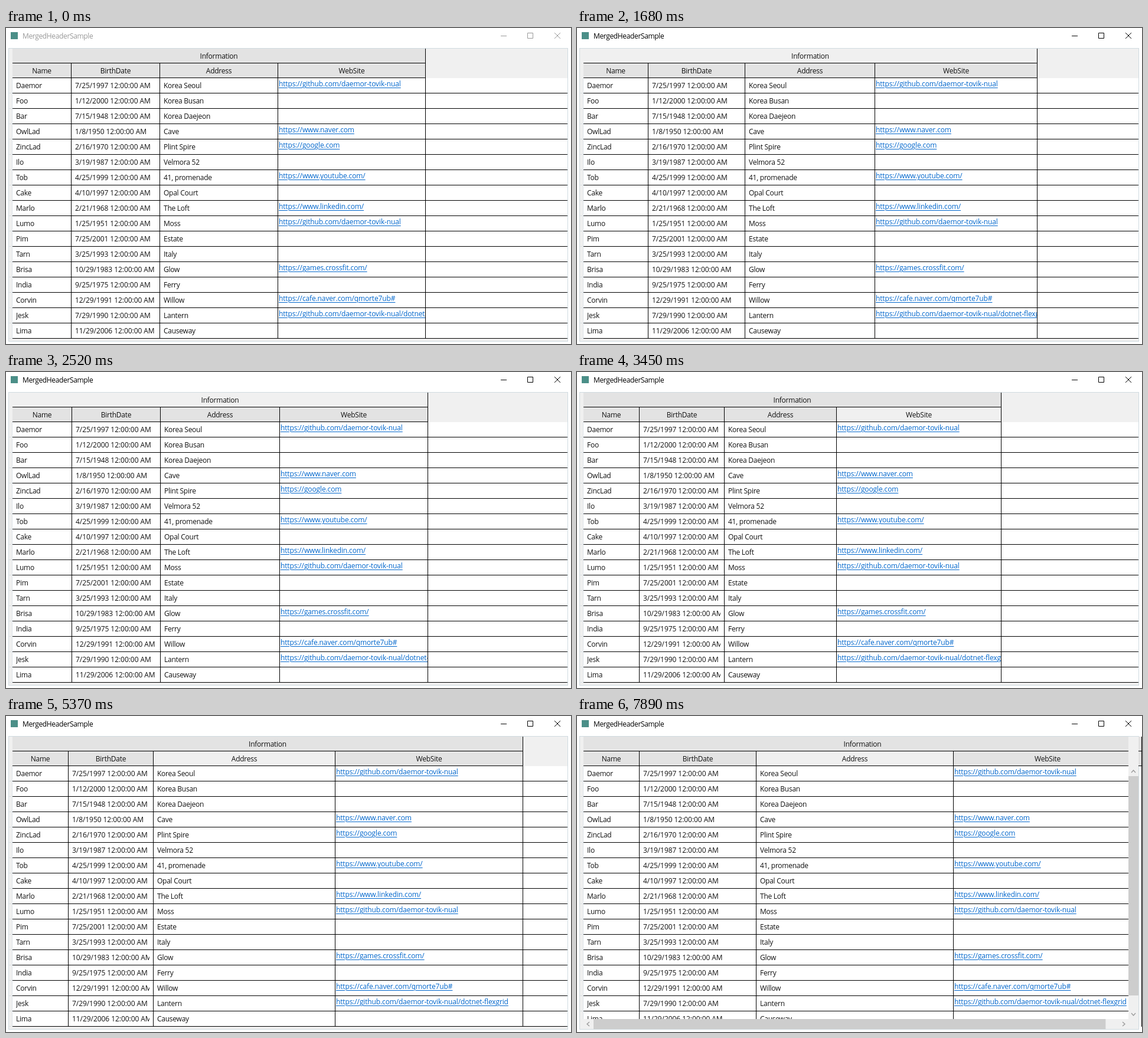
Write an HTML page that moves like this. It is 957 px wide and 536 px high and loops after 8 s.

```html
<!DOCTYPE html>
<html lang="en">
<head>
<meta charset="utf-8">
<title>MergedHeaderSample</title>
<style>
  html, body { margin: 0; width: 100%; height: 100%; overflow: hidden; background: #fff; }
  body { position: relative; font: 12px "Open Sans", "Noto Sans", sans-serif; letter-spacing: -.25px; color: #111; }
  div, svg { position: absolute; box-sizing: border-box; white-space: pre; }
  #title { left: 28px; top: 0; line-height: 27px; letter-spacing: -.36px; }
  #icon { left: 8px; top: 7px; width: 12px; height: 12px; background: #4b8f88; }
  #buttons { left: 0; top: 0; width: 957px; height: 30px; fill: none; stroke: currentColor; }
  #grid { left: 4px; top: 34px; width: 948px; height: 498px; border: 1px solid #cfdae0; background: #f0f0f0; }
  #rows { left: 11px; top: 85px; width: 940px; height: 442px;
    background: repeating-linear-gradient(#fff 0 25px, #000 25px 26px); }
  #ticks { left: 5px; top: 85px; width: 6px; height: 442px;
    background: repeating-linear-gradient(#f0f0f0 0 25px, #dde3e6 25px 26px); border-right: 1px solid #dde3e6; }
  .head { height: 25px; line-height: 25px; text-align: center; background: #e3e3e3; border-bottom: 1px solid #000; }
  .head.hover { background: #f0f0f0; }
  #info { left: 11px; top: 35px; border-right: 1px solid #000; }
  .col { top: 60px; height: 467px; border-right: 1px solid #000; overflow: hidden; }
  .col .head { left: 0; width: 100%; }
  .cell { left: 6px; right: 6px; height: 25px; line-height: 26px; overflow: hidden; }
  .date { letter-spacing: -.06px; }
  .link { left: 1px; right: 0; line-height: 19px; letter-spacing: -.13px; color: #06c;
    text-decoration: underline 1px; text-underline-offset: 2px; }
  #bars { left: 0; top: 0; width: 957px; height: 536px; }
</style>
</head>
<body>
<div id="icon"></div>
<div id="title">MergedHeaderSample</div>
<svg id="buttons"><path d="M838 13.5h10M883.5 8.5h9v9h-9z M929 8l10 10m0-10l-10 10"/></svg>
<div id="grid"></div>
<div id="rows"></div>
<div id="ticks"></div>
<div id="info" class="head">Information</div>
<svg id="bars">
  <path fill="#f0f0f0" d="M934 35h17v496h-17zM5 514h946v17H5z"/>
  <path fill="#cdcdcd" d="M934 102h17v372h-17z"/>
  <rect id="thumb" fill="#cdcdcd" x="28" y="514" height="17"/>
  <path fill="none" stroke="#999" stroke-width="1.3"
    d="M939 96l3.5-4 3.5 4M939 504l3.5 4 3.5-4M21 519l-4 3.5 4 3.5M924 519l4 3.5-4 3.5"/>
</svg>
<script>
const site = 'https://github.com/daemor-tovik-nual';
const people = `Daemor|7/25/1997|Korea Seoul|${site}
Foo|1/12/2000|Korea Busan|
Bar|7/15/1948|Korea Daejeon|
OwlLad|1/8/1950|Cave|https://www.naver.com
ZincLad|2/16/1970|Plint Spire|https://google.com
Ilo|3/19/1987|Velmora 52|
Tob|4/25/1999|41, promenade|https://www.youtube.com/
Cake|4/10/1997|Opal Court|
Marlo|2/21/1968|The Loft|https://www.linkedin.com/
Lumo|1/25/1951|Moss|${site}
Pim|7/25/2001|Estate|
Tarn|3/25/1993|Italy|
Brisa|10/29/1983|Glow|https://games.crossfit.com/
India|9/25/1975|Ferry|
Corvin|12/29/1991|Willow|https://cafe.naver.com/qmorte7ub#
Jesk|7/29/1990|Lantern|${site}/dotnet-flexgrid
Lima|11/29/2006|Causeway|`.split('\n').map(line => line.split('|'));

const $ = id => document.getElementById(id);
function add(parent, className, text = '') {
  const el = document.createElement('div');
  el.className = className;
  el.textContent = text;
  parent.append(el);
  return el;
}

const heads = [$('info')];
const cols = ['Name', 'BirthDate', 'Address', 'WebSite'].map((name, c) => {
  const col = add(document.body, 'col');
  heads.push(add(col, 'head', name));
  people.forEach((person, r) => {
    const text = person[c] + (c == 1 ? ' 12:00:00 AM' : '');
    add(col, 'cell' + ['', ' date', '', ' link'][c], text).style.top = 25 + 26 * r + 'px';
  });
  return col;
});
document.body.append($('bars'));

// Piecewise linear value through [time, value] points.
function track(t, points) {
  let [t0, v0] = points[0];
  for (const [t1, v1] of points) {
    if (t < t1) return t <= t0 ? v0 : v0 + (v1 - v0) * (t - t0) / (t1 - t0);
    [t0, v0] = [t1, v1];
  }
  return v0;
}

const total = [[1320, 700], [1380, 710], [1980, 827], [2100, 836], [2250, 836],
  [2340, 800], [2520, 704], [2610, 675], [2670, 668]];
const grow = [
  [[0, 0]],
  [[7440, 0], [7560, 12], [7770, 45], [7890, 54]],
  [[4920, 0], [4950, 4], [5100, 38], [5340, 112], [5520, 144]],
  [[3270, 0], [3360, 14], [3540, 66], [3630, 80]]
];
// Header under the pointer from each time on.
const hovers = [[0, -1], [840, 0], [2970, 4], [4230, 3], [6540, 2], [7890, 3]];

function draw(now) {
  const t = Math.floor(now % 8000 / 30) * 30;
  const scale = track(t, total) / 700;
  let edge = 11;
  cols.forEach((col, c) => {
    const left = Math.round(edge);
    edge += [100, 150, 200, 250][c] * scale + track(t, grow[c]);
    col.style.left = left + 'px';
    col.style.width = Math.round(edge) - left + 'px';
  });
  const width = Math.round(edge) - 11;
  $('info').style.width = width + 'px';

  const hover = hovers.filter(h => h[0] <= t).pop()[1];
  heads.forEach((head, i) => head.classList.toggle('hover', i == hover));

  $('title').style.color = $('buttons').style.color = t < 1200 ? '#999' : '#000';
  $('bars').style.display = width > 940 ? 'block' : 'none';
  $('thumb').setAttribute('width', 889 * 923 / Math.max(width, 923));
}

const start = performance.now();
function tick() {
  draw(performance.now() - start);
  requestAnimationFrame(tick);
}
tick();
</script>
</body>
</html>
```
